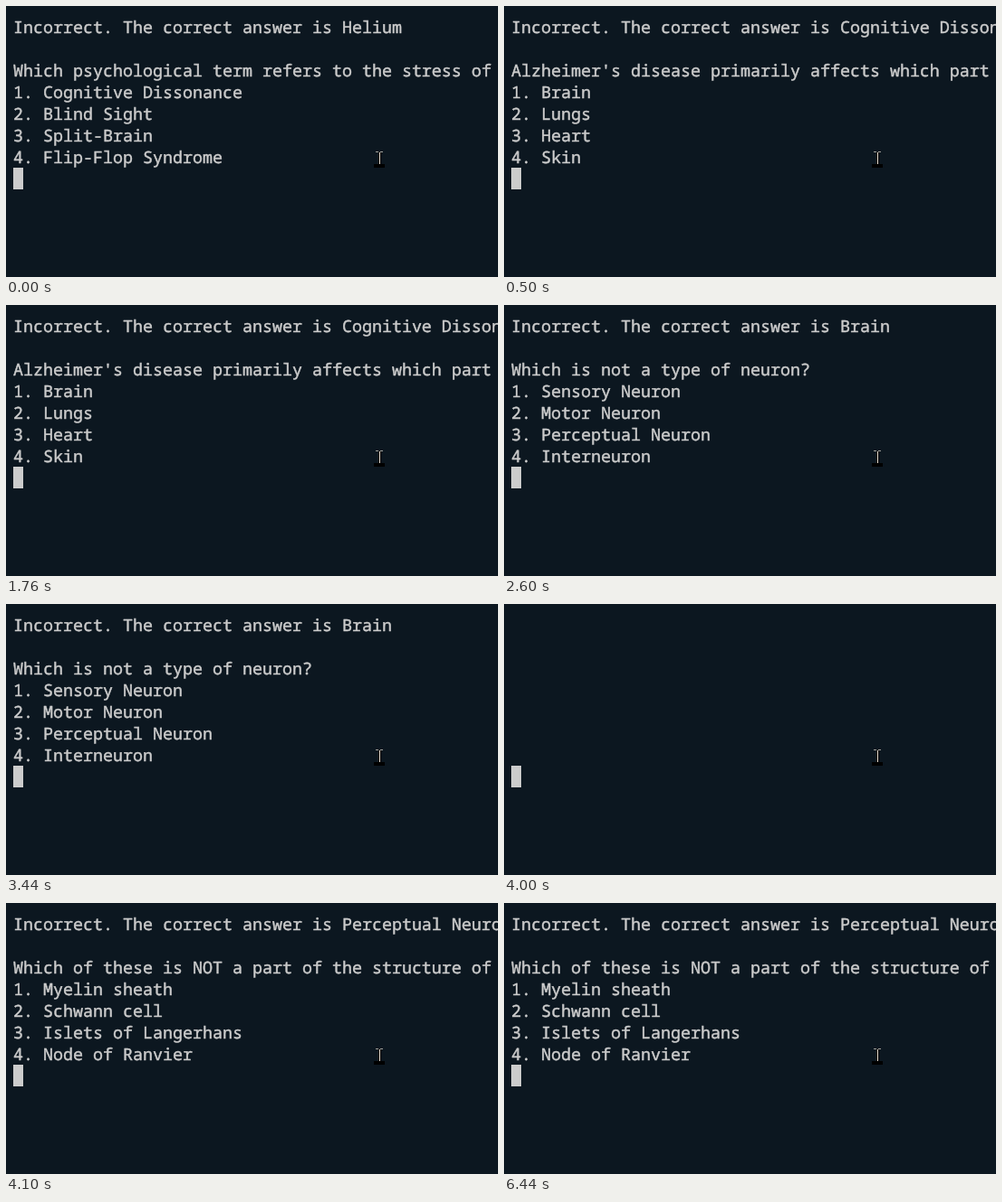
These frames come from a looping animation (543 px wide and 300 px high, 8000 ms). An HTML page:

```html
<!DOCTYPE html>
<html lang="en">
<head>
<meta charset="utf-8">
<title>Terminal quiz</title>
<style>
  html, body { margin: 0; width: 100%; height: 100%; overflow: hidden; background: #0c1720; }
  svg { display: block; width: 543px; height: 300px; }
  text {
    font: 18.3333px "Noto Sans Mono", "DejaVu Sans Mono", monospace;
    fill: #ccc;
    stroke: #ccc;
    stroke-width: 0.45px;
    text-rendering: geometricPrecision;
    font-variant-ligatures: none;
  }
</style>
</head>
<body>
<svg viewBox="0 0 543 300">
  <rect width="543" height="300" fill="#0c1720"/>
  <g id="lines"></g>
  <rect x="8" y="179" width="11" height="24" fill="#ccc"/>
  <g id="pointer" shape-rendering="crispEdges">
    <path d="M411 162h3v13h4v4h-12v-4h5z" fill="#000"/>
    <path d="M408 161h3v1h-3zM413 161h3v1h-3z" fill="#a0a09a"/>
    <path d="M412 162h1v13h-1z" fill="#e8e0d4"/>
  </g>
</svg>
<script>
const LOOP = 8000, LEFT = 8, BASELINE = 30, LINE = 24;

const screens = [
  { at: 0, answer: "Helium",
    question: "Which psychological term refers to the stress of",
    options: ["Cognitive Dissonance", "Blind Sight", "Split-Brain", "Flip-Flop Syndrome"] },
  { at: 500, answer: "Cognitive Dissonance",
    question: "Alzheimer's disease primarily affects which part",
    options: ["Brain", "Lungs", "Heart", "Skin"] },
  { at: 2600, answer: "Brain",
    question: "Which is not a type of neuron?",
    options: ["Sensory Neuron", "Motor Neuron", "Perceptual Neuron", "Interneuron"] },
  { at: 4000 },
  { at: 4100, answer: "Perceptual Neuron",
    question: "Which of these is NOT a part of the structure of",
    options: ["Myelin sheath", "Schwann cell", "Islets of Langerhans", "Node of Ranvier"] },
];

const linesOf = s => s.answer ? [
  `Incorrect. The correct answer is ${s.answer}`,
  "",
  s.question,
  ...s.options.map((o, i) => `${i + 1}. ${o}`),
] : [];

const group = document.getElementById("lines");
const rows = Array.from({ length: 7 }, (_, i) => {
  const row = document.createElementNS("http://www.w3.org/2000/svg", "text");
  row.setAttribute("x", LEFT);
  row.setAttribute("y", BASELINE + i * LINE);
  return group.appendChild(row);
});

let shown;
function show(t) {
  const screen = screens.findLast(s => s.at <= t);
  if (screen === shown) return;
  shown = screen;
  const lines = linesOf(screen);
  rows.forEach((row, i) => { row.textContent = lines[i] || ""; });
}

const start = performance.now();
function tick() {
  show((performance.now() - start) % LOOP);
  requestAnimationFrame(tick);
}
tick();
</script>
</body>
</html>
```
